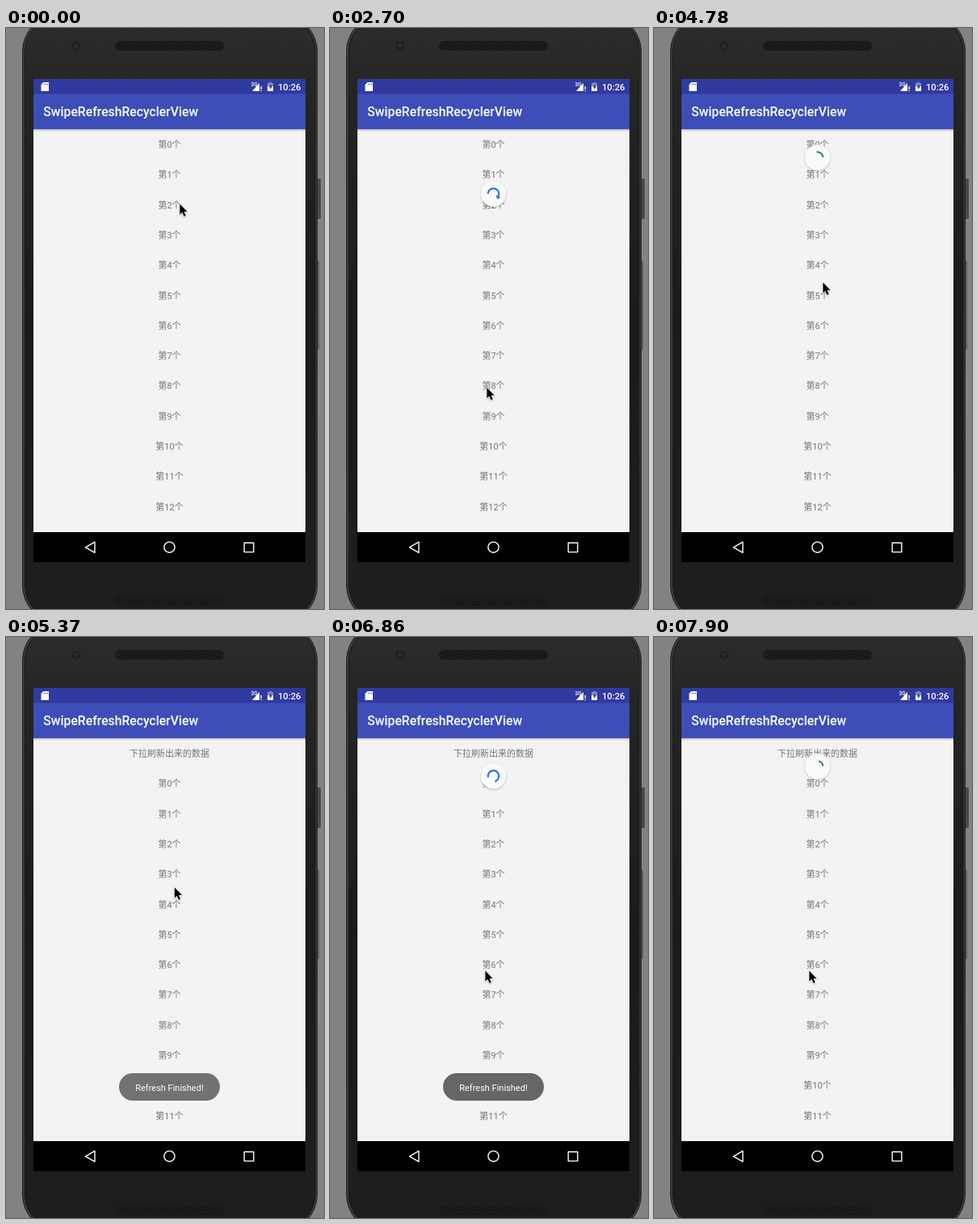
An HTML page that plays this animation: 394 px wide and 718 px high, repeating every 8000 ms.

```html
<!DOCTYPE html>
<html lang="zh">
<head>
<meta charset="utf-8">
<title>SwipeRefreshRecyclerView</title>
<style>
  html, body { margin: 0; width: 100%; height: 100%; overflow: hidden; background: #828282; }
  svg { display: block; width: 394px; height: 718px; }
  text { font-family: Roboto, "Noto Sans CJK SC", "Noto Sans CJK", sans-serif; }
  .bold { font-weight: 500; fill: #fff; }
  #rows { font-size: 11px; fill: #747474; text-anchor: middle; }
  #nav { fill: none; stroke: #fff; stroke-width: 1.4; stroke-linejoin: round; }
</style>
</head>
<body>
<svg viewBox="0 0 394 718">
  <defs>
    <linearGradient id="bodyFill" x2="0" y2="1">
      <stop offset="0" stop-color="#2d2d2d"/>
      <stop offset=".12" stop-color="#252525"/>
      <stop offset=".5" stop-color="#1b1b1b"/>
      <stop offset="1" stop-color="#1e1e1e"/>
    </linearGradient>
    <linearGradient id="barShadow" x2="0" y2="1">
      <stop offset="0" stop-opacity=".24"/>
      <stop offset="1" stop-opacity="0"/>
    </linearGradient>
    <pattern id="mesh" width="4" height="4" patternUnits="userSpaceOnUse">
      <rect width="4" height="4" fill="#222"/>
      <circle cx="1" cy="1" r="1" fill="#0c0c0c"/>
      <circle cx="3" cy="3" r="1" fill="#0c0c0c"/>
    </pattern>
    <clipPath id="listArea"><rect x="34" y="126" width="337" height="497"/></clipPath>
    <filter id="soft" x="-50%" y="-50%" width="200%" height="200%">
      <feDropShadow dx="0" dy="1" stdDeviation="1.2" flood-opacity=".3"/>
    </filter>
  </defs>

  <!-- phone -->
  <rect width="394" height="718" fill="#828282"/>
  <g fill="#4a4a4a">
    <rect x="385" y="186" width="5" height="50" rx="1"/>
    <rect x="385" y="288" width="3" height="110" rx="1" fill="#5c5c5c"/>
  </g>
  <rect x="20.5" y="-17" width="365" height="752" rx="46" fill="#3c3c3c" stroke="#1c1c1c"/>
  <rect x="23.5" y="-14" width="359.5" height="746" rx="43" fill="url(#bodyFill)" stroke="#141414"/>
  <circle cx="87" cy="22" r="5.5" fill="#202020"/>
  <circle cx="87" cy="22" r="2.8" fill="#2b2d30"/>
  <g fill="url(#mesh)">
    <rect x="135" y="16" width="135" height="12" rx="6"/>
    <rect x="135" y="702" width="135" height="12" rx="6"/>
  </g>

  <!-- screen -->
  <rect x="34" y="63" width="337" height="597"/>
  <rect x="34" y="125" width="337" height="498" fill="#f3f3f3"/>
  <g id="rows"></g>
  <g clip-path="url(#listArea)">
    <g id="spinner">
      <circle r="15.6" fill="#fafafa" filter="url(#soft)"/>
      <g id="ring" fill="none" stroke-width="2">
        <circle id="arc" r="6.8" pathLength="360"/>
        <path id="arrow" d="M3.6 0h6.4l-3.2 3.6z" stroke="none"/>
      </g>
    </g>
  </g>
  <g id="toast">
    <rect x="140" y="539" width="125" height="34" rx="17" fill="#666"/>
    <text x="202.5" y="560.5" font-size="11" fill="#fff" text-anchor="middle">Refresh Finished!</text>
  </g>

  <rect x="34" y="125" width="337" height="3" fill="url(#barShadow)"/>
  <rect x="34" y="81" width="337" height="44" fill="#3d4eb8"/>
  <rect x="34" y="63" width="337" height="18.5" fill="#303b9f"/>
  <text class="bold" x="46.3" y="109" font-size="15.75">SwipeRefreshRecyclerView</text>
  <g fill="#fff">
    <path d="M46.5 67h6.5v11h-9.5v-8z"/>
    <path d="M47.5 68.5v2m2-2v2m2-2v2" stroke="#303b9f" stroke-width=".8"/>
    <text class="bold" x="303.5" y="72" font-size="6.5">3G</text>
    <path d="M314 68v10h-9z"/>
    <path d="M315.5 72h1.3v4h-1.3zm0 5h1.3v1.2h-1.3z"/>
    <path d="M326 67h3v1h2v10h-7v-10h2z" opacity=".4"/>
    <path d="M324 72h7v6h-7z"/>
    <path d="M328.5 69l-2.8 4.4h1.6v3l2.6-4.3h-1.4z" fill="#303b9f"/>
    <text class="bold" x="337" y="76.5" font-size="11.2">10:26</text>
  </g>
  <g id="nav">
    <path d="M98.5 641.8l11.5-6.6v13.2z"/>
    <circle cx="202.5" cy="641.7" r="6.6"/>
    <rect x="295.2" y="636.2" width="11.6" height="11.4"/>
  </g>

  <path id="cursor" d="M.4.6v13l3-2.8 2.1 5 2.2-.9-2.1-4.9h4z"
        stroke="#fff" stroke-width=".9" paint-order="stroke" filter="url(#soft)"/>
</svg>

<script>
const LOOP = 8000, STEP = 149.06;
const SHRINK = 666, CYCLE = 1332, MIN_ARC = 10, MAX_ARC = 288;
const REST_Y = 107, PULL = 98;

// [time, x, y]
const cursorTrack = [
  [0, 215, 217], [590, 201, 160], [750, 201, 160], [1200, 204, 225], [1630, 198, 316],
  [1800, 198, 316], [2080, 193, 199], [2250, 193, 199], [2380, 192, 280], [2530, 193, 390],
  [2680, 194, 444], [2840, 194, 444], [3420, 209, 314], [5200, 209, 314], [5500, 208, 305],
  [5820, 208, 305], [6250, 193, 142], [6410, 192, 142], [6550, 192, 330], [6700, 192, 412]
];

// Two pulls: spinner height over time, ring angles on release, and the angle where spinning begins.
const pulls = [
  { track: [[2250, REST_Y], [2380, 139], [2530, 183], [2680, 205], [2840, 205], [2980, 172], [3125, 160]],
    release: 2850, spin: 3050, end: 4950, from: 180, to: 385, base: 595 },
  { track: [[6410, REST_Y], [6550, 182], [6700, 205], [6855, 172], [7000, 160]],
    release: 6850, spin: 7070, end: 9000, from: 165, to: 435, base: 614 }
];

const $ = id => document.getElementById(id);
const clamp = v => Math.min(1, Math.max(0, v));
const mix = (a, b, k) => a + (b - a) * k;
const ramp = (t, a, b) => clamp((t - a) / (b - a));
const ease = x => 1 - (1 - x ** 1.6) ** 2.2;

function sample(track, t) {
  const i = track.findIndex(key => key[0] > t);
  if (i < 0) return track.at(-1).slice(1);
  const a = track[Math.max(0, i - 1)], b = track[i];
  const k = ramp(t, a[0], b[0]);
  return a.slice(1).map((v, n) => mix(v, b[n + 1], k));
}

function ringAngles(pull, t, y) {
  if (t < pull.release) {
    const k = clamp((y - REST_Y) / PULL), start = pull.from - 120 * (1 - k);
    return [start, start + (pull.to - pull.from) * k];
  }
  const since = t - pull.spin;
  if (since < SHRINK) {
    const k = ease(clamp(since / SHRINK));
    return [mix(pull.from, pull.base, k), mix(pull.to, pull.base + MIN_ARC, k)];
  }
  const phase = (since - SHRINK) / CYCLE % 1, turn = pull.base + 234 * phase;
  return [turn + MAX_ARC * ease(clamp(2 * phase - 1)),
          turn + MIN_ARC + MAX_ARC * ease(clamp(2 * phase))];
}

function drawSpinner(t) {
  const pull = pulls.find(p => t > p.track[0][0] && t < p.end + 150);
  $("spinner").style.display = pull ? "" : "none";
  if (!pull) return;
  const [y] = sample(pull.track, t);
  const [start, end] = ringAngles(pull, t, y);
  const color = t < pull.spin + SHRINK ? "#1a6be8" : "#138a5b";
  $("spinner").setAttribute("transform", `translate(202.5 ${y}) scale(${1 - ramp(t, pull.end, pull.end + 150)})`);
  $("arc").setAttribute("transform", `rotate(${start})`);
  $("arc").setAttribute("stroke-dasharray", `${end - start} 360`);
  $("arc").setAttribute("stroke", color);
  $("arrow").setAttribute("transform", `rotate(${end})`);
  $("arrow").setAttribute("fill", t < pull.release ? color : "none");
}

$("rows").innerHTML = Array.from({ length: 13 }, (_, i) =>
  `<text x="202.5" y="${148 + 37.3 * i}"></text>`).join("");
const rows = [...$("rows").children];
let listState;

function drawList(refreshed) {
  if (refreshed === listState) return;
  listState = refreshed;
  rows.forEach((row, i) => {
    row.textContent = refreshed && !i ? "下拉刷新出来的数据" : `第${refreshed ? i - 1 : i}个`;
  });
}

function draw() {
  const t = Math.floor(performance.now() % LOOP / STEP + .05) * STEP;
  $("cursor").setAttribute("transform", `translate(${sample(cursorTrack, t)})`);
  drawList(t >= 5000);
  drawSpinner(t);
  $("toast").setAttribute("opacity", ramp(t, 5000, 5400) * (1 - ramp(t, 7100, 7550)));
  requestAnimationFrame(draw);
}
draw();
</script>
</body>
</html>
```
